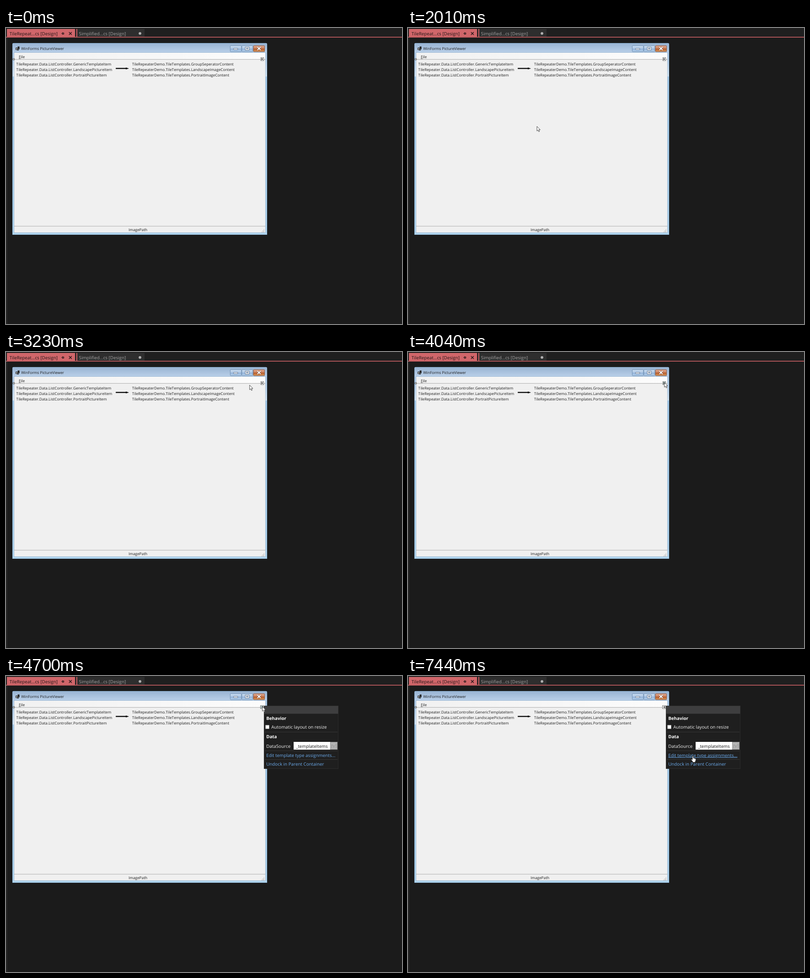
These frames come from a looping animation (866 by 647 pixels, 8000 ms). An HTML page:

```html
<!DOCTYPE html>
<html lang="en">
<head>
<meta charset="utf-8">
<title>Form designer</title>
<style>
  html, body { margin: 0; width: 100%; height: 100%; overflow: hidden; background: #1b1b1b; }
  svg { display: block; width: 100%; height: 100%; }
  text {
    font: 8.23px "Open Sans", "Noto Sans", sans-serif;
    font-kerning: none;
    font-variant-ligatures: none;
    text-rendering: geometricPrecision;
    fill: #1c1c1c;
  }
  .big text { font-size: 9.8px; fill: #f2f2f2; }
  .big .head { font-weight: 700; fill: #fff; }
  .big .link { fill: #6cabec; }
  .big .dark { font-size: 9.6px; fill: #1c1c1c; }
  .over { text-decoration: underline; }
</style>
</head>
<body>
<svg viewBox="0 0 866 647" preserveAspectRatio="none">
  <defs>
    <linearGradient id="bar" x2="0" y2="1">
      <stop stop-color="#98b3d2"/><stop offset="1" stop-color="#bad0e9"/>
    </linearGradient>
    <linearGradient id="side" x2="0" y2="1">
      <stop stop-color="#a5c0de"/><stop offset=".1" stop-color="#bcd4ec"/>
      <stop offset=".174" stop-color="#e2eff9"/><stop offset=".175" stop-color="#a4cbea"/>
      <stop offset="1" stop-color="#b3d7ef"/>
    </linearGradient>
    <linearGradient id="menu" x2="1" y2="0">
      <stop stop-color="#f1f1f1"/><stop offset="1" stop-color="#fcfcfc"/>
    </linearGradient>
    <linearGradient id="btn" x2="0" y2="1">
      <stop stop-color="#c6d9ee"/><stop offset=".48" stop-color="#b2cae6"/>
      <stop offset=".5" stop-color="#93b2d8"/><stop offset="1" stop-color="#b4d0ec"/>
    </linearGradient>
    <linearGradient id="shut" x2="0" y2="1">
      <stop stop-color="#dda78f"/><stop offset=".48" stop-color="#cc8360"/>
      <stop offset=".5" stop-color="#b4582c"/><stop offset="1" stop-color="#d99757"/>
    </linearGradient>
  </defs>

  <!-- editor tabs -->
  <rect width="866" height="647" fill="#1b1b1b"/>
  <rect width="866" height="20" fill="#1f1f1f"/>
  <rect x="1" y="21" width="1.3" height="626" fill="#303030"/>
  <rect x="2" y="2" width="149" height="18" fill="#d0666a"/>
  <rect x="153.5" y="2" width="2.5" height="18" fill="#b9595d"/>
  <rect x="156" y="2" width="147" height="17" fill="#2e2e2e"/>
  <rect y="19.2" width="866" height="1.8" fill="#b9595d"/>
  <g class="big">
    <text x="7.8" y="15.6" style="fill:#211516">TileRepeat...cs [Design]</text>
    <text x="159.6" y="15.6" style="fill:#a3a3a3">Simplified...cs [Design]</text>
  </g>
  <path d="M121 12h2M123.5 9.5v5M123.5 10.5h3v3h-3M124 13h3" stroke="#211516" fill="none"/>
  <path d="M137.8 9l6 6M143.8 9l-6 6" stroke="#211516" stroke-width="1.3"/>
  <circle cx="293" cy="11.8" r="2.9" fill="#b0b0b0"/>

  <!-- form window -->
  <path d="M14 452V36q0-3 3-3h551q3 0 3 3v416z" fill="url(#side)"/>
  <path d="M14 54V36q0-3 3-3h551q3 0 3 3v18z" fill="url(#bar)"/>
  <path d="M14.4 451.5V36q0-2.6 2.6-2.6h551q2.6 0 2.6 2.6v415.5z" fill="none" stroke="#8fb9dd" stroke-width=".8"/>
  <rect x="17.6" y="53.6" width="549.8" height="393.8" fill="#f0f0f0" stroke="#86a9ca" stroke-width=".7"/>
  <rect x="18" y="54" width="549" height="14.5" fill="url(#menu)"/>
  <path d="M18 68.6h549M18 433.2h549" stroke="#a5a5a5" stroke-width=".9"/>
  <rect x="21" y="43" width="4" height="5" fill="#222"/>
  <rect x="22" y="44.5" width="2" height="2.3" fill="#eee"/>
  <rect x="25.5" y="40.5" width="4" height="6" fill="#222"/>
  <rect x="24" y="47" width="4" height="2" fill="#333"/>
  <text x="33.2" y="48.4">WinForms PictureViewer</text>
  <g stroke="#6383a8" stroke-width=".8">
    <rect x="490.4" y="38.4" width="24.4" height="13.4" rx="1.5" fill="url(#btn)"/>
    <rect x="515.8" y="38.4" width="24" height="13.4" rx="1.5" fill="url(#btn)"/>
    <rect x="541" y="38.4" width="24.6" height="13.4" rx="1.5" fill="url(#shut)" stroke="#7d4a35"/>
    <rect x="497.8" y="44.6" width="9" height="2.6" fill="#fff" stroke="#53657d"/>
    <rect x="523.2" y="41.4" width="8.6" height="7" fill="#fff" stroke="#53657d"/>
    <rect x="525.8" y="43.8" width="3.4" height="2.2" fill="#a8c2e0" stroke="#53657d"/>
  </g>
  <path id="x" d="M549.8 41.6l7 6.6M556.8 41.6l-7 6.6" stroke="#6b4337" stroke-width="3.3"/>
  <path d="M549.8 41.6l7 6.6M556.8 41.6l-7 6.6" stroke="#fff" stroke-width="2"/>
  <text x="28" y="65.5"><tspan text-decoration="underline">F</tspan>ile</text>

  <g id="rows"></g>
  <path d="M240 87.2h22v-1l7 2.2-7 2.2v-1h-22z" fill="#000"/>
  <text x="268" y="443.6">ImagePath</text>
  <path d="M564 440.5v6M561.6 443v4M559.2 445.4v1.2" stroke="#a2a2a2" stroke-width="1.3" stroke-dasharray="1.3 1.1"/>
  <rect x="15.4" y="66.8" width="3" height="3" fill="#fff" stroke="#222" stroke-width=".8"/>

  <g id="tag">
    <rect id="tagBox" x="557.2" y="64.8" width="6.4" height="6.4" fill="#fff" stroke="#4a4a4a" stroke-width=".8"/>
    <path id="tagArrow" fill="#111"/>
  </g>

  <!-- smart tag panel -->
  <g id="panel" class="big">
    <rect x="564" y="65" width="163" height="138" fill="#1f1f1f"/>
    <rect x="564.3" y="65.3" width="162.4" height="137" fill="none" stroke="#343434" stroke-width=".7"/>
    <rect x="564.5" y="65.5" width="162" height="17" fill="#3e3e3f"/>
    <g id="items">
      <path d="M566 122.5h159M566 163.4h159M566 182.5h159" stroke="#3a3a3a" stroke-width=".9"/>
      <text class="head" x="569.2" y="96">Behavior</text>
      <rect x="567.4" y="107.3" width="8.2" height="8.2" rx="1" fill="#fff" stroke="#777" stroke-width=".8"/>
      <text x="580.3" y="115.4">Automatic layout on resize</text>
      <text class="head" x="569.2" y="136.2">Data</text>
      <text x="569.2" y="156.6">DataSource</text>
      <rect x="629" y="144" width="96" height="17" fill="#fff"/>
      <text class="dark" x="634.2" y="156.6">_templateItems</text>
      <rect x="709.4" y="144.6" width="15" height="15.8" fill="#b5b5b5" stroke="#8a8a8a"/>
      <path d="M712.5 150v8M722 148v10M714 150.5l3 3.5 3-3.5M717 154v4" fill="none" stroke="#777" stroke-dasharray="1.4 .8"/>
      <text id="edit" class="link" x="569.2" y="176.7">Edit template type assignments...</text>
      <text class="link" x="569.2" y="195.8">Undock in Parent Container</text>
    </g>
  </g>

  <g id="cursor">
    <path id="arrow" d="M0 0V10.2L2.3 8.1L4 11.8L5.7 11L4.1 7.4H7.2Z" fill="#fff" stroke="#222" stroke-width=".8"/>
    <path id="hand" d="M-1 1Q0-.6 1 1V5.2Q2.4 4.6 2.9 5.6Q4.2 5 4.7 6.1Q6 5.7 6.3 7V10L5.2 12V14H-.4V12.4L-3.6 8.4Q-3.6 6.8-2.2 7.4L-1 8.6Z" fill="#fff" stroke="#222" stroke-width=".7"/>
  </g>
</svg>
<script>
  const LOOP = 8000, OPEN = 4570, FILLED = 4700;
  const $ = id => document.getElementById(id);
  const show = (id, on) => { $(id).style.display = on ? "" : "none"; };

  const rows = [
    ["GenericTemplateItem", "GroupSeperatorContent"],
    ["LandscapePictureItem", "LandscapeImageContent"],
    ["PortraitPictureItem", "PortraitImageContent"]
  ];
  $("rows").innerHTML = rows.map(([item, content], i) => {
    const y = 82.2 + i * 11.7;
    return `<text x="22.6" y="${y}">TileRepeater.Data.ListController.${item}</text>` +
      `<text x="275.8" y="${y}">TileRepeaterDemo.TileTemplates.${content}</text>`;
  }).join("");

  // Pointer moves: start, end, number of steps, points along the way.
  const moves = [
    [1180, 1940, 11, [[789, 594], [740, 535], [600, 400], [440, 285], [330, 228], [274, 207]]],
    [2010, 2210, 4, [[282, 215], [292, 212], [303, 206], [312, 199]]],
    [2540, 3300, 12, [[317, 196], [355, 170], [420, 123], [478, 90], [518, 75], [545, 70]]],
    [3370, 4040, 9, [[551, 70], [564, 70], [568, 69], [564, 67.5], [560.7, 66.7]]],
    [6880, 7440, 9, [[569.5, 88], [584, 116], [602, 146], [616, 166], [623, 174.5]]]
  ];

  function along(points, u) {
    const s = u * (points.length - 1);
    const i = Math.min(Math.floor(s), points.length - 2);
    return points[i].map((v, k) => v + (points[i + 1][k] - v) * (s - i));
  }

  function pointer(t) {
    const move = moves.filter(m => t >= m[0]).pop();
    if (!move) return null;
    const [from, to, steps, points] = move;
    const u = Math.min(1, (t - from) / (to - from));
    return along(points, Math.floor(u * (steps - 1) + 1e-6) / (steps - 1));
  }

  function draw(t) {
    const p = pointer(t), open = t >= OPEN;
    show("cursor", p);
    const onLink = open && p[1] > 165;
    const onTag = p && p[0] > 556 && p[0] < 565 && p[1] < 71;
    if (p) $("cursor").setAttribute("transform", `translate(${p[0]} ${p[1]})`);
    show("arrow", !onLink);
    show("hand", onLink);
    $("edit").classList.toggle("over", onLink);
    $("tagBox").setAttribute("fill", onTag ? "#cfe3e3" : "#fff");
    $("tagArrow").setAttribute("d", open ? "M562 65.8v4.4l-3-2.2z" : "M559 65.8v4.4l3-2.2z");
    $("tag").setAttribute("transform", open ? "translate(-.6 0)" : "");
    show("panel", t >= OPEN + 70);
    show("items", t >= FILLED);
  }

  const start = performance.now();
  function tick() {
    draw((performance.now() - start) % LOOP);
    requestAnimationFrame(tick);
  }
  tick();
</script>
</body>
</html>
```
